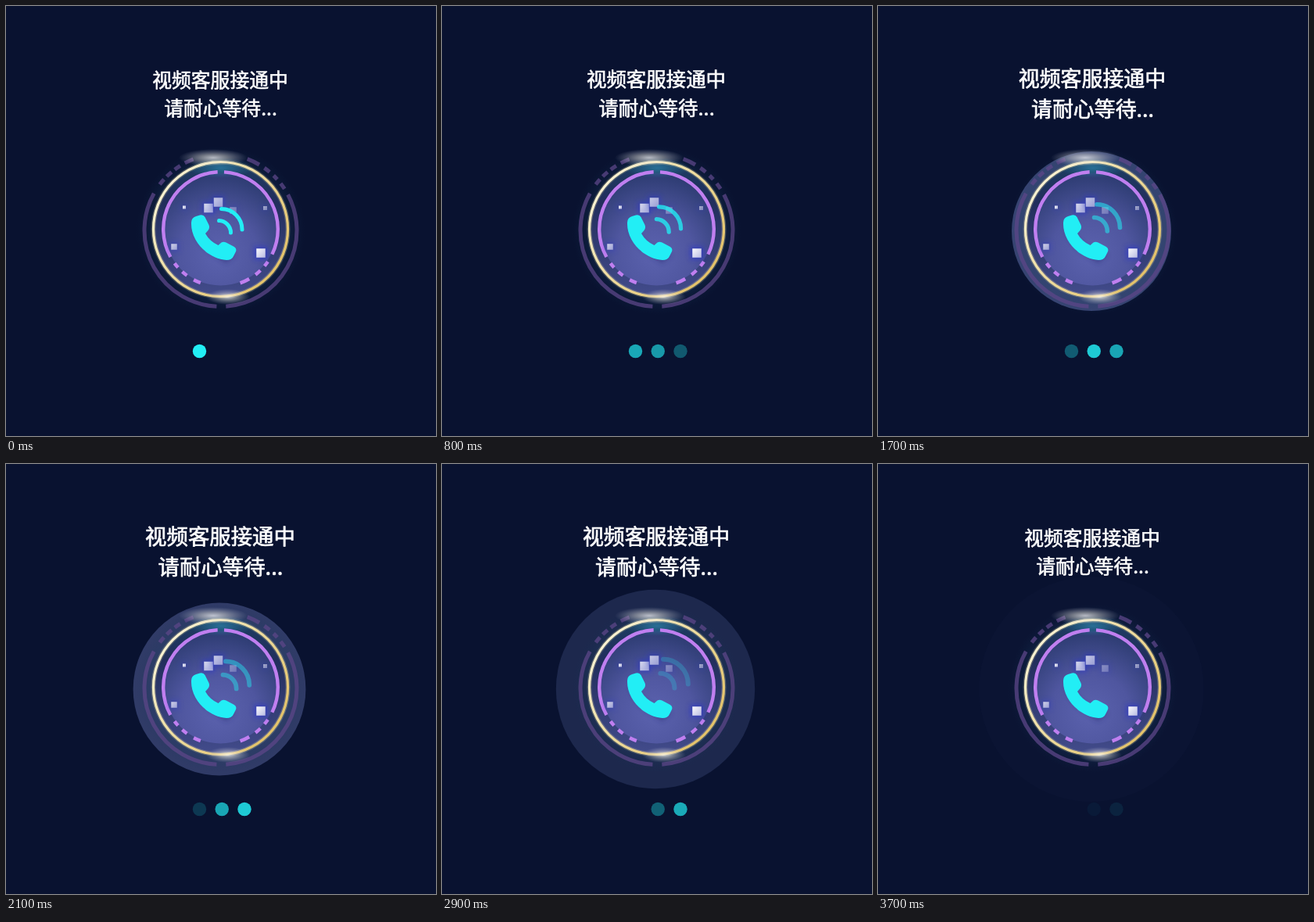
An HTML page for the animation above (3.8 s loop, 550x550 px).

```html
<!DOCTYPE html>
<html lang="zh-CN">
<head>
<meta charset="utf-8">
<style>
html, body { margin: 0; width: 100%; height: 100%; overflow: hidden; background: #091230; }
svg { display: block; width: 100vw; height: 100vh; }
text { font: 500 24.8px "Noto Sans CJK SC", "Noto Sans CJK", sans-serif; text-anchor: middle; fill: #fff; stroke: #fff; stroke-width: .65; }
</style>
</head>
<body>
<svg viewBox="0 0 550 550">
  <defs>
    <linearGradient id="disc" x1="0" y1="0" x2="0" y2="1">
      <stop offset="0" stop-color="#1c3d62"/>
      <stop offset=".3" stop-color="#222e5c"/>
      <stop offset="1" stop-color="#434c8c"/>
    </linearGradient>
    <radialGradient id="core" cx=".48" cy=".72" r=".78">
      <stop offset="0" stop-color="#5b62ae"/>
      <stop offset=".45" stop-color="#4f569f"/>
      <stop offset="1" stop-color="#27376a"/>
    </radialGradient>
    <linearGradient id="gold" x1="0" y1="0" x2="1" y2=".8">
      <stop offset="0" stop-color="#fffbe8"/>
      <stop offset=".35" stop-color="#f3e6b4"/>
      <stop offset="1" stop-color="#e2bf62"/>
    </linearGradient>
    <linearGradient id="chip" x1="0" y1="0" x2="1" y2="1">
      <stop offset="0" stop-color="#fff"/>
      <stop offset="1" stop-color="#bdbfe4"/>
    </linearGradient>
    <radialGradient id="halo">
      <stop offset=".8" stop-color="#1d4468" stop-opacity=".55"/>
      <stop offset="1" stop-color="#123050" stop-opacity="0"/>
    </radialGradient>
    <radialGradient id="shine">
      <stop offset="0" stop-color="#fff"/>
      <stop offset=".4" stop-color="#f4f0e6" stop-opacity=".6"/>
      <stop offset="1" stop-color="#c8c8dc" stop-opacity="0"/>
    </radialGradient>
    <radialGradient id="teal">
      <stop offset="0" stop-color="#2d86ac" stop-opacity=".7"/>
      <stop offset="1" stop-color="#2d86ac" stop-opacity="0"/>
    </radialGradient>
    <filter id="blur" x="-100%" y="-100%" width="300%" height="300%"><feGaussianBlur stdDeviation="3"/></filter>
    <filter id="soft"><feGaussianBlur stdDeviation=".7"/></filter>
  </defs>

  <g id="title">
    <text x="274" y="103.6">视频客服接通中</text>
    <text x="274.5" y="139.6">请耐心等待...</text>
  </g>

  <circle id="pulse" cx="273" cy="288" fill="#6270ac"/>

  <circle cx="274.5" cy="287" r="108" fill="url(#halo)" opacity=".5"/>
  <path id="outer" fill="none" stroke="#5c4688" stroke-width="5" opacity=".75" filter="url(#soft)"/>
  <circle cx="274.5" cy="285.5" r="87" fill="url(#disc)"/>
  <circle cx="274.5" cy="285.5" r="72" fill="url(#core)"/>
  <ellipse cx="275" cy="207" rx="42" ry="13" fill="url(#teal)"/>
  <path id="inner" fill="none" stroke="#c07ff0" stroke-width="4.4" filter="url(#soft)"/>
  <circle cx="274.5" cy="285.5" r="86" fill="none" stroke="#e8d9a0" stroke-width="6" opacity=".25"/>
  <circle cx="274.5" cy="285.5" r="86" fill="none" stroke="url(#gold)" stroke-width="3.2"/>
  <ellipse cx="265" cy="194" rx="44" ry="11" fill="url(#shine)" opacity=".7"/>
  <ellipse cx="284" cy="372" rx="28" ry="10" fill="url(#shine)" opacity=".7"/>

  <g id="chips"></g>
  <path d="M240 281Q243 308 282 329L294 318 262 305Z" fill="#252c72" opacity=".5" filter="url(#blur)"/>
  <g id="waves" fill="none" stroke="#22eef5" stroke-width="5" stroke-linecap="round">
    <path d="M275.500 259.500A26.500 26.500 0 0 1 302 286"/>
    <path d="M272.500 274.500A15.500 15.500 0 0 1 287.500 290"/>
  </g>
  <path fill="#22eef5" d="M237 277Q237 271 243 269L248 267.500Q252.500 266.500 254.500 270L259.500 280Q261 284 258.500 287L255 291Q260.500 301 271.500 306L275.500 302.500Q278 301 281.500 302.500L291 307.500Q295.500 310 294 314L291 320Q289 325 282 325C258 323 236 301 237 277Z"/>
  <g id="dots" fill="#22eef5">
    <circle cx="247.500" cy="441.500" r="8.700"/>
    <circle cx="276.200" cy="441.500" r="8.700"/>
    <circle cx="305" cy="441.500" r="8.700"/>
  </g>
</svg>
<script>
const LOOP = 3800, STEP = 100, MID = 1300, PEAK = 2500;
const $ = id => document.getElementById(id);

// Clockwise arcs given as [start, end] in degrees
function arcs(cx, cy, r, spans) {
  const at = deg => {
    const a = deg * Math.PI / 180;
    return `${cx + r * Math.cos(a)} ${cy + r * Math.sin(a)}`;
  };
  return spans.map(([a, b]) => `M${at(a)}A${r} ${r} 0 ${b - a > 180 ? 1 : 0} 1 ${at(b)}`).join("");
}

$("outer").setAttribute("d", arcs(274.5, 287, 97.5, [
  [-28, 86], [93, 209], [-143, -138], [-135, -130], [-127, -122], [-118, -111],
  [-69.5, -59.5], [-55, -50], [-46, -42], [-38, -33]
]));
$("inner").setAttribute("d", arcs(274.5, 285.5, 73.3, [
  [-86.5, 26], [151, 267], [138, 143.5], [126, 132], [110.5, 118],
  [34.5, 40], [46, 52.5], [60, 70]
]));

// Chips: centre x, centre y, size, opacity
$("chips").innerHTML = [
  [228, 257.5, 4, .95], [259, 258.5, 11.5, .8], [271.5, 251, 11.5, .72], [290.5, 261.5, 8.5, .38],
  [331.5, 258.5, 5, .55], [215, 308, 7.5, .75], [326, 316, 11.5, .98]
].map(([x, y, s, o]) => {
  const box = (k, rest) => `<rect x="${x - k / 2}" y="${y - k / 2}" width="${k}" height="${k}" ${rest}/>`;
  return box(s + 5, `fill="#2a36c8" opacity="${o * s / 17}" filter="url(#blur)"`) +
    box(s, `fill="url(#chip)" opacity="${o}" filter="url(#soft)"`);
}).join("");

const clamp = v => Math.max(0, Math.min(1, v));
const ease = v => (1 - Math.cos(Math.PI * clamp(v))) / 2;
const rise = (t, top) => t < top ? t / top : (LOOP - t) / (LOOP - top);
const zoom = (el, x, y, s) =>
  el.setAttribute("transform", `translate(${x} ${y}) scale(${s}) translate(${-x} ${-y})`);

function draw(now) {
  const t = Math.floor(now % LOOP / STEP) * STEP;
  const swell = t < PEAK ? ease(t / PEAK) : ease((3700 - t) / (3700 - PEAK));
  zoom($("title"), 274.2, 113, 1 + .112 * swell);

  $("pulse").setAttribute("r", 66.3 + .021 * t);
  $("pulse").setAttribute("opacity", clamp(1 - t / 3770));

  zoom($("waves"), 238, 308, 1 + .000069 * t);
  $("waves").setAttribute("opacity", clamp(1 - t / 3700));

  [1 - t / 2550, rise(t, MID), rise(t, PEAK)].forEach((o, i) =>
    $("dots").children[i].setAttribute("opacity", clamp(o)));
}

let start;
function tick(now) {
  start ??= now;
  draw(now - start);
  requestAnimationFrame(tick);
}
draw(0);
requestAnimationFrame(tick);
</script>
</body>
</html>
```
